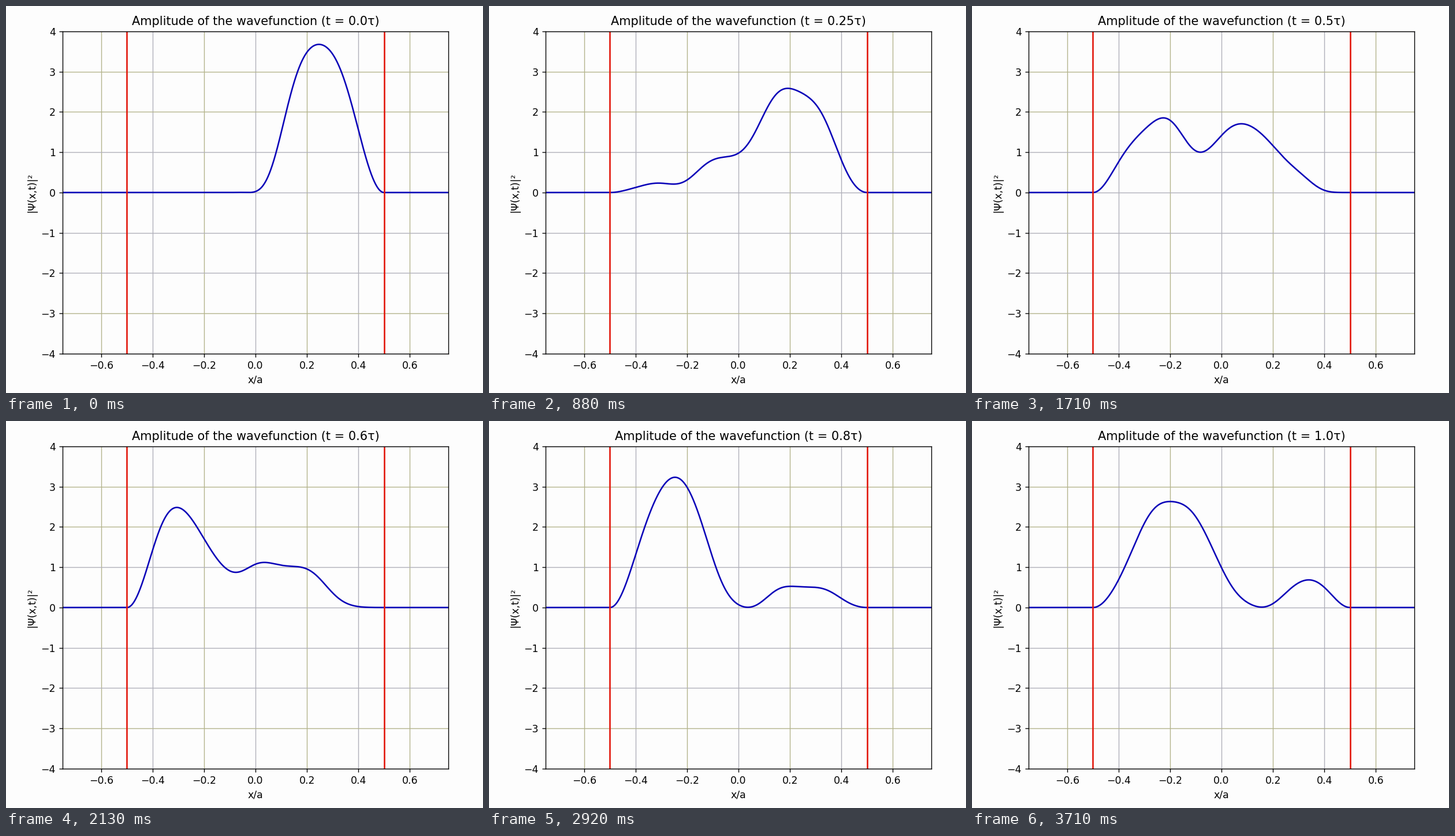
Write a matplotlib script that moves like this. It is 826 by 670 pixels and loops after 3.75 s.

```python
import numpy as np
import matplotlib.pyplot as plt
from matplotlib.animation import FuncAnimation

W, H, DPI = 826, 670, 125
LOOP_MS, STEP_MS = 3750, 30
HOLD_MS = 1000 / 3
MODES = 10
TIMES = [0.0, 0.1, 0.25, 0.3, 0.4, 0.5, 0.6, 0.7, 0.8, 0.9, 1.0]

PAPER = "#fdfdfd"
GREY, OLIVE = "#b0b0ba", "#b4b48c"
BLUE, RED = "#0a02b8", "#e2160a"

plt.rcParams.update({"font.family": "DejaVu Sans", "font.size": 10})


def mode(n, x):
    """Eigenfunction n of the box from -0.5 to 0.5."""
    return np.sqrt(2) * np.sin(n * np.pi * (x + 0.5))


# The packet starts as a normalised parabola in the right half of the box.
s = (np.arange(4000) + 0.5) / 8000
start = np.sqrt(960) * s * (0.5 - s)
coeffs = [np.sum(start * mode(n, s)) / 8000 for n in range(1, MODES + 1)]

x = np.linspace(-0.75, 0.75, 1201)
inside = np.abs(x) <= 0.5


def density(t):
    psi = sum(c * mode(n, x) * np.exp(-1j * n * n * t)
              for n, c in enumerate(coeffs, 1))
    return np.where(inside, np.abs(psi) ** 2, 0)


fig = plt.figure(figsize=(W / DPI, H / DPI), dpi=DPI, facecolor=PAPER)
ax = fig.add_axes([98.1 / W, 68.1 / H, 668 / W, 558 / H], facecolor=PAPER)
ax.set_xlim(-0.75, 0.75)
ax.set_ylim(-4, 4)
ax.set_xticks(np.arange(-3, 4) / 5)
ax.set_yticks(range(-4, 5))
ax.set_xlabel("x/a")
ax.set_ylabel("|Ψ(x,t)|²")
ax.grid(linewidth=0.8)
ax.set_axisbelow(True)


def tint_grid(axis, olive):
    for tick, line in zip(axis.get_ticklocs(), axis.get_gridlines()):
        line.set_color(OLIVE if round(tick, 1) in olive else GREY)


tint_grid(ax.xaxis, (-0.6, -0.2, 0.2, 0.6))
tint_grid(ax.yaxis, (-3, 2, 3))

curve, = ax.plot(x, density(0), color=BLUE, linewidth=1.5)
for wall in (-0.5, 0.5):
    ax.axvline(wall, color=RED, linewidth=1.5)
title = ax.set_title("", fontsize=12)


def update(frame):
    step = int((frame * STEP_MS + STEP_MS / 2) // HOLD_MS)
    t = TIMES[min(step, len(TIMES) - 1)]
    curve.set_ydata(density(t))
    title.set_text(f"Amplitude of the wavefunction (t = {t}τ)")
    return curve, title


anim = FuncAnimation(fig, update, frames=LOOP_MS // STEP_MS,
                     interval=STEP_MS, repeat=True, repeat_delay=0)
plt.show()
```
